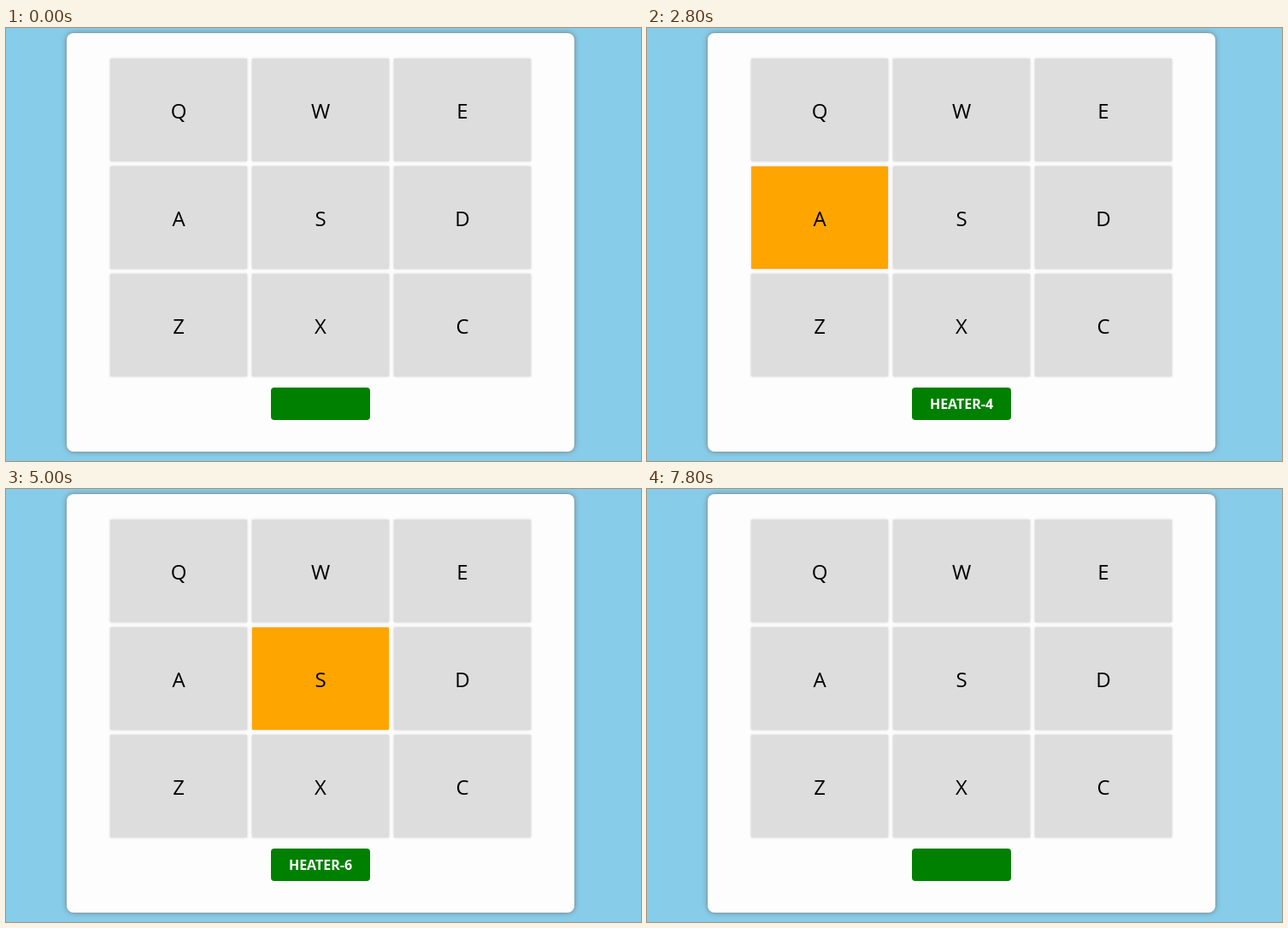
Animation of 743x507 px, one loop 8060 ms. Source, as an HTML page:

```html
<!DOCTYPE html>
<html lang="en">
<head>
<meta charset="utf-8">
<title>Drum pads</title>
<style>
  html, body { margin: 0; width: 100%; height: 100%; overflow: hidden; background: #87cdea; }
  svg { display: block; width: 743px; height: 507px; }
  text { font-family: "Open Sans", "Noto Sans", sans-serif; text-anchor: middle; }
  .panel { fill: #fdfdfd; filter: drop-shadow(0 0 3px #777); }
  .pad { fill: #ddd; filter: drop-shadow(0 0 1.5px #ccc); }
  .pad.on { fill: #ffa500; }
  .key { font-size: 24px; }
  .label { font-size: 16px; font-weight: 700; fill: #fff; }
</style>
</head>
<body>
<svg id="stage" viewBox="0 0 743 507">
  <rect class="panel" x="71" y="6" width="594" height="490" rx="8"/>
  <g id="pads"></g>
  <rect x="310" y="421" width="116" height="38" rx="4" fill="#008000"/>
  <text class="label" id="label" x="368" y="446"></text>
</svg>
<script>
const LOOP = 8060;
const SOUNDS = {
  Q: "HEATER-1", W: "HEATER-2", E: "HEATER-3",
  A: "HEATER-4", S: "HEATER-6", D: "OPEN-HH",
  Z: "KICK-N'-HAT", X: "KICK", C: "CLOSED-HH"
};

// key, pressed at, released at (ms)
const PRESSES = [
  ["Q", 860, 1000], ["D", 1460, 1860],
  ["S", 2200, 2260], ["S", 2460, 2660],
  ["A", 2800, 3200],
  ["Q", 3460, 3660], ["Q", 3730, 4000],
  ["W", 4060, 4260],
  ["S", 4730, 4800], ["S", 5000, 5130],
  ["Z", 5330, 5660], ["X", 5930, 6260],
  ["C", 6600, 6730], ["C", 6860, 7130],
  ["X", 7330, 7800]
];

const padGroup = document.getElementById("pads");
const label = document.getElementById("label");
const pads = {};

function add(tag, attrs) {
  const el = document.createElementNS(padGroup.namespaceURI, tag);
  for (const name in attrs) el.setAttribute(name, attrs[name]);
  return padGroup.appendChild(el);
}

Object.keys(SOUNDS).forEach((key, i) => {
  const x = 122 + (i % 3) * 166;
  const y = 36 + Math.floor(i / 3) * 126;
  pads[key] = add("rect", { class: "pad", x, y, width: 160, height: 120, rx: 1 });
  add("text", { class: "key", x: x + 80, y: y + 70 }).textContent = key;
});

let active = null;

function render(time) {
  const press = PRESSES.find(([, down, up]) => time >= down && time < up);
  const key = press ? press[0] : null;
  if (key === active) return;
  if (active) pads[active].classList.remove("on");
  if (key) pads[key].classList.add("on");
  label.textContent = key ? SOUNDS[key] : "";
  active = key;
}

const start = performance.now();

function tick() {
  render((performance.now() - start) % LOOP);
  requestAnimationFrame(tick);
}
tick();
</script>
</body>
</html>
```
